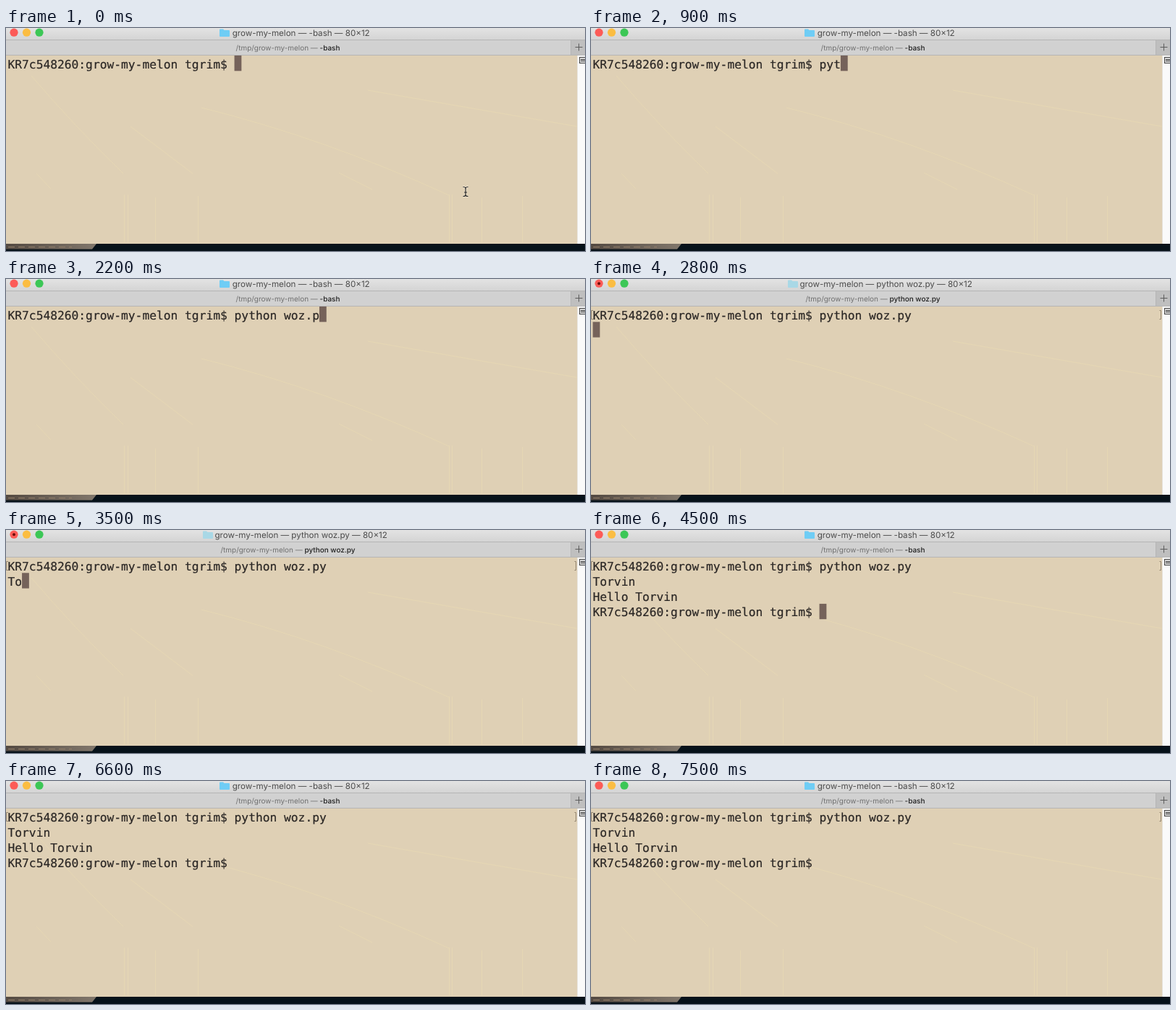
These frames come from a looping animation (800 px wide and 308 px high, 7.6 s). An HTML page:

```html
<!DOCTYPE html>
<html lang="en">
<head>
<meta charset="utf-8">
<title>Terminal</title>
<style>
  html, body { margin: 0; width: 100%; height: 100%; overflow: hidden; }
  svg { display: block; }
  text { white-space: pre; text-rendering: geometricPrecision; }
  .ui { font-family: Inter, "Open Sans", sans-serif; text-anchor: middle; }
  .term {
    font: 16.25px "DejaVu Sans Mono", monospace;
    fill: #2b2725; stroke: #2b2725; stroke-width: .2;
  }
</style>
</head>
<body>
<svg width="800" height="308" viewBox="0 0 800 308">
  <defs>
    <linearGradient id="bar" x2="0" y2="1">
      <stop stop-color="#e3e3e3"/><stop offset="1" stop-color="#d3d3d3"/>
    </linearGradient>
    <linearGradient id="desk">
      <stop stop-color="#544a42"/><stop offset="1" stop-color="#81776c"/>
    </linearGradient>
  </defs>

  <!-- title bar and tab bar -->
  <rect width="800" height="17" fill="url(#bar)"/>
  <rect y="16" width="800" height="22" fill="#b5b5b5"/>
  <rect y="17" width="780" height="20" fill="#d1d1d1"/>
  <rect x="781" y="17" width="19" height="20" fill="#bfbfbf"/>
  <path d="M786.5 26.5h10M791.5 21.5v10" stroke="#5c5c5c"/>
  <circle cx="11" cy="6.2" r="5.6" fill="#fc5b57"/>
  <circle cx="28.5" cy="6.2" r="5.6" fill="#fbbd42"/>
  <circle cx="46" cy="6.2" r="5.6" fill="#3cc756"/>
  <circle id="busy" cx="11" cy="6.2" r="2" fill="#6b0d0a"/>
  <path id="folder" d="M0 2.5q0-1 1-1h4l1.5 1.5H13q1 0 1 1V11q0 1-1 1H1q-1 0-1-1z"/>
  <text id="title" class="ui" x="407.7" y="10.8" font-size="11.6" fill="#4b4b4b"></text>
  <text class="ui" x="389.5" y="30.5" font-size="9.95" fill="#6f6f6f"><tspan id="path"></tspan><tspan id="job" font-weight="500" fill="#1f1f1f"></tspan></text>

  <!-- terminal body -->
  <rect y="38" width="789" height="260" fill="#dfd0b5"/>
  <g fill="none" stroke="#e6d7b4">
    <path d="M35 66Q95 136 162 201M172 136L258 201M270 110Q440 152 612 231M500 86L789 136M42 201L62 222M460 200L506 223"/>
    <path d="M163.5 230v66M168.5 230v66M206.5 234v62M265.5 232v64M612.5 230v66M616.5 230v66M657.5 234v62M713.5 232v64"/>
  </g>
  <rect x="789" y="38" width="11" height="260" fill="#fafafa"/>
  <path d="M789.5 38v260" stroke="#e6e2da"/>
  <rect x="792.5" y="40.5" width="9" height="8" fill="#d8d8d8" stroke="#444"/>
  <path d="M794 43.5h6M794 45.5h6" stroke="#3a3a3a"/>

  <!-- strip of desktop below the window -->
  <rect y="298" width="800" height="10" fill="#07121a"/>
  <path d="M0 298h125l-6 7.5H0z" fill="url(#desk)"/>
  <path d="M3 302.5h88" stroke="#94806a" stroke-dasharray="9 5"/>

  <path id="marks" d="M3 43.5H.5v12H3M785.5 43.5h2v12h-2" fill="none" stroke="#938570"/>
  <rect id="caret" width="9.8" height="21.3" fill="#75625a"/>
  <g id="lines"></g>
  <g id="pointer" fill="none">
    <path d="M631.5 219.5q3.5 0 3.5 2v9q0 2-3.5 2M638.5 219.5q-3.5 0-3.5 2v9q0 2 3.5 2M633 227h4" stroke="#f5ead6" stroke-width="2.6"/>
    <path d="M631.5 219.5q3.5 0 3.5 2v9q0 2-3.5 2M638.5 219.5q-3.5 0-3.5 2v9q0 2 3.5 2M633 227h4" stroke="#222" stroke-width="1.2"/>
  </g>
</svg>
<script>
const LOOP = 7600, BLINK = 1200, CHAR = 9.783, ROW = 21.3;
const RUN = 2700, NAME_AT = 3300, DONE = 4400;
const folderName = "grow-my-melon", command = "python woz.py", person = "Torvin";
const prompt = `KR7c548260:${folderName} tgrim$ `;
const $ = id => document.getElementById(id);
const show = (id, on) => $(id).setAttribute("visibility", on ? "visible" : "hidden");

const rows = [0, 1, 2, 3].map(i => {
  const row = document.createElementNS("http://www.w3.org/2000/svg", "text");
  row.setAttribute("class", "term");
  row.setAttribute("x", 2.5);
  row.setAttribute("y", 55.5 + i * ROW);
  return $("lines").appendChild(row);
});

// Typed part of a word and the time of its latest keystroke
function type(word, t, start, step) {
  const count = Math.max(0, Math.min(word.length, Math.floor((t - start) / step) + 1));
  return { text: word.slice(0, count), last: count ? start + (count - 1) * step : 0 };
}

function draw(t) {
  const typed = type(command, t, 600, 140);
  const name = type(person, t, NAME_AT, 140);
  const lines = [prompt + typed.text];
  let last = typed.last;
  if (t >= RUN) {
    lines.push(name.text);
    last = Math.max(RUN, name.last);
  }
  if (t >= DONE) {
    lines.push("Hello " + person, prompt);
    last = DONE;
  }
  rows.forEach((row, i) => row.textContent = lines[i] || "");

  const end = lines.length - 1;
  $("caret").setAttribute("x", 2.5 + lines[end].length * CHAR);
  $("caret").setAttribute("y", 38 + end * ROW);
  show("caret", (t - last) % BLINK < BLINK / 2);

  const running = t >= RUN && t < DONE;
  const job = running ? command : "-bash";
  $("title").textContent = `${folderName} — ${job} — 80×12`;
  $("path").textContent = `/tmp/${folderName} — `;
  $("job").textContent = job;
  $("folder").setAttribute("transform", `translate(${running ? 272 : 295})`);
  $("folder").setAttribute("fill", running ? "#a9d8e6" : "#6fcdf5");
  show("busy", running);
  show("marks", t >= RUN);
  show("pointer", t < 600);
}

const begin = performance.now();
function frame() {
  draw((performance.now() - begin) % LOOP);
  requestAnimationFrame(frame);
}
frame();
</script>
</body>
</html>
```
